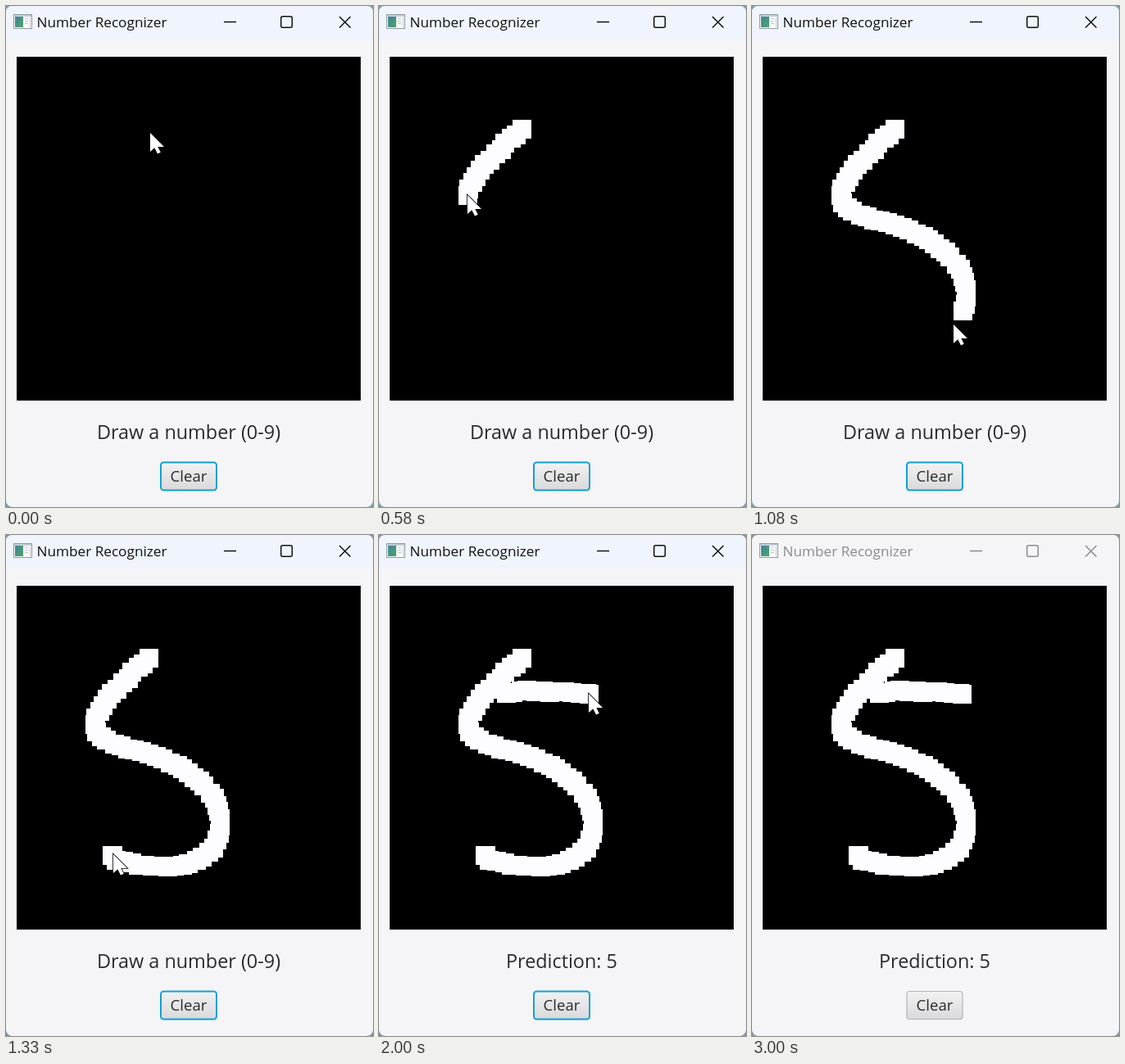
These frames come from a looping animation (448x612 px, 3080 ms). An HTML page:

```html
<!DOCTYPE html>
<html lang="en">
<head>
<meta charset="utf-8">
<title>Number Recognizer</title>
<style>
  html, body { margin: 0; width: 100%; height: 100%; overflow: hidden; background: #8299a6; }
  svg { display: block; width: 448px; height: 612px; }
  text { font-family: "Open Sans", "Noto Sans", sans-serif; fill: #2b2b2b; }
  .window { fill: #f5f5f8; }
  .bar { fill: #eff4fd; }
  .caption { font-size: 17.2px; fill: #111; }
  .controls { fill: none; stroke: #111; stroke-width: 1.5; }
  .message { font-size: 23.4px; text-anchor: middle; }
  .label { font-size: 18.6px; text-anchor: middle; }
  .button { stroke: #10a0d4; stroke-width: 2; }
  .ink { fill: #fdfcff; shape-rendering: crispEdges; }
  .cursor { fill: #fff; stroke: #000; stroke-width: 1.6; paint-order: stroke; }
  .blurred .bar { fill: #f5f5f8; }
  .blurred .caption { fill: #8b8b8b; }
  .blurred .controls { stroke: #8b8b8b; }
  .blurred .button { stroke: #b5b5b8; stroke-width: 1.2; }
</style>
</head>
<body>
<svg id="app" viewBox="0 0 448 612">
  <defs>
    <linearGradient id="face" x2="0" y2="1">
      <stop offset="0" stop-color="#f2f2f3"/>
      <stop offset="1" stop-color="#d9d9db"/>
    </linearGradient>
    <linearGradient id="pane" x2="1" y2="1">
      <stop offset="0" stop-color="#3f83a0"/>
      <stop offset="1" stop-color="#4fa562"/>
    </linearGradient>
  </defs>

  <rect class="window" width="448" height="612" rx="8"/>
  <path class="bar" d="M0 41V8Q0 0 8 0H440Q448 0 448 8V41Z"/>

  <rect x="9.5" y="10.5" width="22" height="17" fill="#fafafa" stroke="#8f9aa0"/>
  <rect x="10" y="11" width="21" height="2" fill="#c3d0d8"/>
  <rect x="11" y="13" width="10" height="13" fill="url(#pane)"/>
  <path d="M23 15.5H27M23 18.5H27M23 21.5H27M29.5 14V26" stroke="#c2c8cc"/>

  <text class="caption" x="37.500" y="26">Number Recognizer</text>
  <g class="controls">
    <path d="M266 19.5H281M407 13L420.5 26.5M420.5 13L407 26.5"/>
    <rect x="335.7" y="12.700" width="13.6" height="13.6" rx="2"/>
  </g>

  <rect x="13" y="62" width="420" height="420"/>
  <path id="ink" class="ink"/>

  <text id="message" class="message" x="223" y="529"></text>
  <rect class="button" x="189" y="557.5" width="68" height="34" rx="3.5" fill="url(#face)"/>
  <text class="label" x="223" y="581">Clear</text>

  <path id="cursor" class="cursor" d="M0 0V23L5.300 18.300L9 25.500L12.800 23.700L9.300 17H17Z"/>
</svg>
<script>
const LOOP = 3080, TICKS_PER_MS = 0.012;
const PREDICT = 17, BLUR = 36;
const NIB = 23, SPACING = 9, JITTER = 2;

// Mouse path in ticks; pen legs leave ink, lead lets the cursor run ahead of it
const legs = [
  { from: 0, to: 2, d: "M176 155L175 152" },
  { from: 3.2, to: 7, pen: true, d: "M174 150C152 170 109 212 108 231" },
  { from: 7, to: 11, pen: true, d: "M108 231C108 262 180 260 222 290" },
  { from: 11, to: 16, lead: 0.8, pen: true,
    d: "M222 290C250 310 262 330 262 352S246 405 198 405C170 405 150 402 130 396V391" },
  { from: 16, to: 19, d: "M131 390L148 327L155 193" },
  { from: 19, to: 24, pen: true, d: "M155 193C185 186 215 194 256 194" },
  { from: 24, to: 29, d: "M256 194L470 520" }
];

const $ = id => document.getElementById(id);
const app = $("app"), ink = $("ink"), cursor = $("cursor"), message = $("message");

for (const leg of legs) {
  leg.path = document.createElementNS("http://www.w3.org/2000/svg", "path");
  leg.path.setAttribute("d", leg.d);
  leg.length = leg.path.getTotalLength();
}

const noise = n => {
  const v = Math.sin(n * 12.9898) * 43758.5453;
  return (v - Math.floor(v) - 0.5) * JITTER;
};

function reach({ from, to, length }, tick, lead = 0) {
  const part = (tick - from + lead) / (to - from + lead);
  return length * Math.min(1, Math.max(0, part));
}

function stamp(leg, at, dx = 0, dy = 0) {
  const p = leg.path.getPointAtLength(at);
  const x = Math.round(p.x + dx - NIB / 2), y = Math.round(p.y + dy - NIB / 2);
  return `M${x} ${y}h${NIB}v${NIB}h${-NIB}z`;
}

// Spaced square stamps give the stroke its stepped edge
function trail(leg, tick) {
  const end = reach(leg, tick);
  let d = stamp(leg, 0) + stamp(leg, end);
  for (let s = SPACING; s < end; s += SPACING) d += stamp(leg, s, noise(s), noise(s + 1));
  return d;
}

function draw(tick) {
  const inked = legs.filter(leg => leg.pen && leg.from < tick);
  ink.setAttribute("d", inked.map(leg => trail(leg, tick)).join(""));

  const leg = legs.findLast(leg => leg.from <= tick);
  const { x, y } = leg.path.getPointAtLength(reach(leg, tick, leg.lead));
  cursor.setAttribute("transform", `translate(${Math.round(x)} ${Math.round(y)})`);

  message.textContent = tick < PREDICT ? "Draw a number (0-9)" : "Prediction: 5";
  app.classList.toggle("blurred", tick >= BLUR);
}

let shown = -1;
function frame() {
  const t = performance.now() % LOOP;
  const tick = Math.floor((t + 4) * TICKS_PER_MS);
  if (tick !== shown) draw(shown = tick);
  requestAnimationFrame(frame);
}
frame();
</script>
</body>
</html>
```
